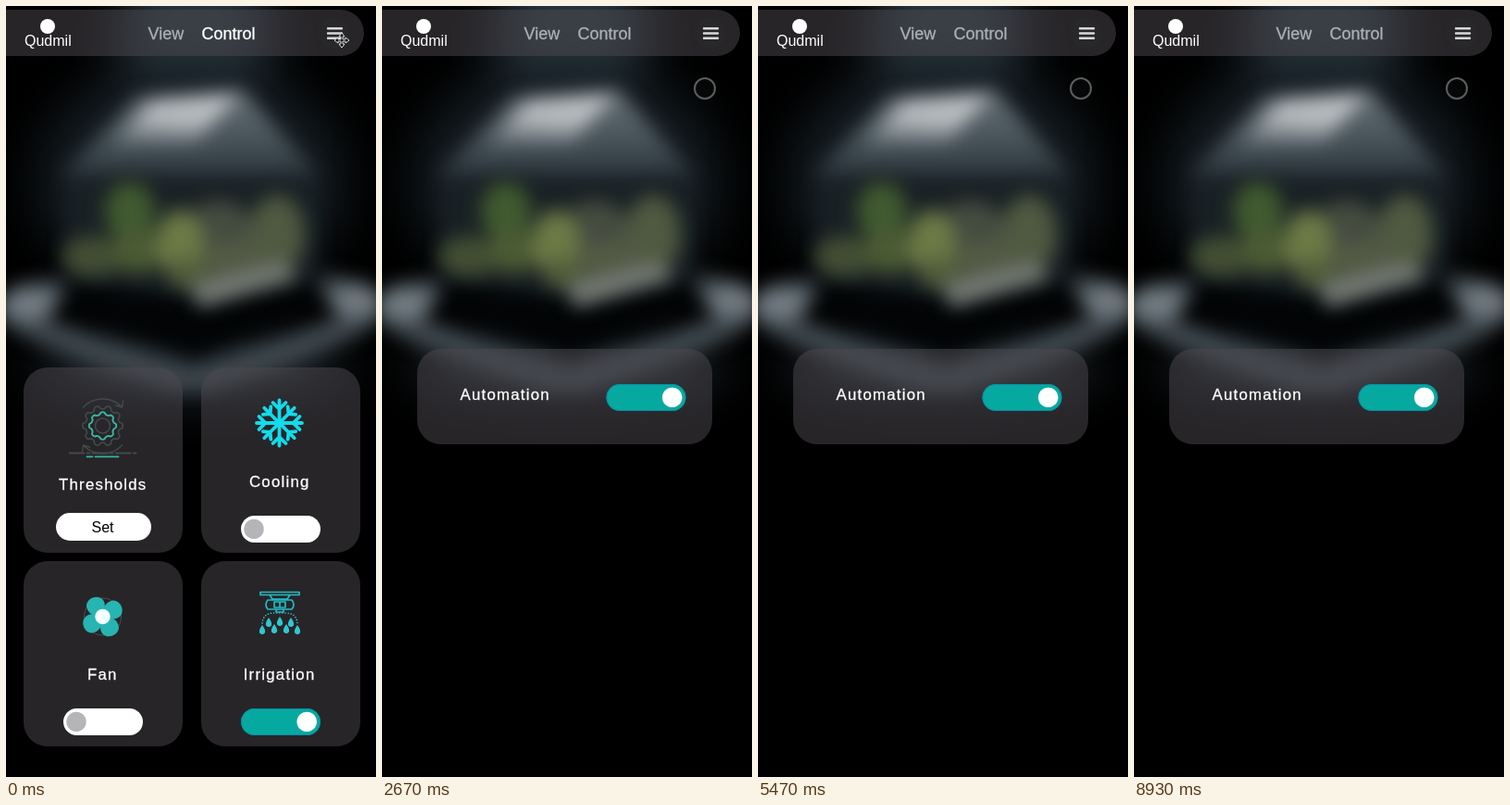
Recreate the animation shown at these times as an HTML page. Size 400 by 832 pixels, loop 9 s.

```html
<!DOCTYPE html>
<html lang="en">
<head>
<meta charset="utf-8">
<title>Greenhouse control</title>
<style>
  html, body { margin: 0; width: 100%; height: 100%; overflow: hidden; background: #000; }
  svg { position: absolute; inset: 0; width: 100%; height: 100%; display: block; }
  #scene { will-change: transform; }
  text { font-family: "Liberation Sans", Arial, sans-serif; fill: #fff; }
  .label { font-size: 16.8px; letter-spacing: 1.25px; stroke: #fff; stroke-width: .3px; }
  .nav { font-size: 18px; fill: #adb0b3; stroke: #adb0b3; stroke-width: .3px; }
  .nav.active { fill: #fff; stroke: #fff; }
  .glass { fill: rgba(78, 75, 81, .5); }
  .line { fill: none; stroke-linecap: round; stroke-linejoin: round; }
</style>
</head>
<body>
<svg id="scene" viewBox="0 0 400 832">
  <defs>
    <filter id="soft" filterUnits="userSpaceOnUse" x="-100" y="-100" width="600" height="700" color-interpolation-filters="sRGB"><feGaussianBlur stdDeviation="10"/></filter>
    <filter id="haze" filterUnits="userSpaceOnUse" x="-100" y="-100" width="600" height="700" color-interpolation-filters="sRGB"><feGaussianBlur stdDeviation="26"/></filter>
    <linearGradient id="roof" x2="0" y2="1">
      <stop offset="0" stop-color="#667077"/><stop offset=".55" stop-color="#4a555c"/><stop offset="1" stop-color="#2c363d"/>
    </linearGradient>
    <linearGradient id="shine" x1=".6" y1="0" x2=".4" y2="1">
      <stop offset="0" stop-color="#c3c7c9"/><stop offset=".5" stop-color="#b4b9bc"/><stop offset="1" stop-color="#59646b"/>
    </linearGradient>
  </defs>
  <g filter="url(#haze)">
    <ellipse cx="205" cy="25" rx="85" ry="75" fill="#27343c"/>
    <ellipse cx="200" cy="190" rx="165" ry="130" fill="#151d22"/>
    <ellipse cx="200" cy="388" rx="170" ry="32" fill="#232c32"/>
  </g>
  <g filter="url(#soft)">
    <path class="line" d="M52 308Q-6 314 6 332Q45 360 190 402" stroke="#3f494f" stroke-width="28"/>
    <path class="line" d="M350 304Q408 312 394 330Q355 360 212 402" stroke="#3f494f" stroke-width="28"/>
    <ellipse cx="26" cy="322" rx="28" ry="17" fill="#727c82"/>
    <ellipse cx="377" cy="319" rx="27" ry="17" fill="#707a80"/>
    <path d="M72 300L335 296L346 318L205 380L56 322Z" fill="#020405"/>
    <path d="M66 180H336V296L205 315L66 296Z" fill="#192125"/>
    <path d="M60 182L142 98L257 91L338 182Z" fill="url(#roof)"/>
    <path d="M112 152L158 102L254 94L206 146Z" fill="url(#shine)"/>
  </g>
  <g filter="url(#soft)">
    <ellipse cx="134" cy="222" rx="27" ry="32" fill="#415a30"/>
    <ellipse cx="95" cy="270" rx="34" ry="21" fill="#434f34"/>
    <ellipse cx="143" cy="264" rx="28" ry="24" fill="#4b5b34"/>
    <ellipse cx="230" cy="245" rx="38" ry="35" fill="#454c40"/>
    <ellipse cx="293" cy="246" rx="30" ry="42" fill="#4f5a41"/>
    <ellipse cx="255" cy="276" rx="46" ry="24" fill="#525944"/>
    <ellipse cx="188" cy="256" rx="26" ry="36" fill="#6c7a46"/>
    <ellipse cx="195" cy="288" rx="22" ry="16" fill="#525d3b"/>
    <path d="M200 300L300 276L316 294L208 326Z" fill="#757a75"/>
  </g>
</svg>

<svg viewBox="0 0 400 832">
  <path class="glass" d="M0 4H362A25 25 0 0 1 362 54H0Z"/>
  <circle cx="45" cy="22" r="8" fill="#fff"/>
  <text x="20" y="43" font-size="16">Qudmil</text>
  <text class="nav" x="153.5" y="35.5">View</text>
  <text class="nav" id="control" x="211.5" y="35.5">Control</text>
  <circle id="menu" cx="354.7" cy="29.5" r="16.5"/>
  <path id="bars" class="line" d="M348 24.2H363M348 29.5H363M348 34.8H363" stroke-width="2.4"/>
  <g id="controlPage"></g>
  <g id="settingsPage"></g>
  <g id="dropdown">
    <path d="M305 67H371V91A10 10 0 0 1 361 101H315A10 10 0 0 1 305 91Z" fill="#363c41"/>
    <text x="315" y="88" font-size="12">Settings</text>
  </g>
  <circle id="ring" r="11" fill="rgba(20,20,20,.2)" stroke-width="2"/>
  <path id="cursor" d="M0-8L3-4H1V-1H4V-3L8 0L4 3V1H1V4H3L0 8L-3 4H-1V1H-4V3L-8 0L-4-3V-1H-1V-4H-3Z" fill="#111" stroke="#ddd" stroke-width="1"/>
</svg>

<script>
const el = id => document.getElementById(id);
const LOOP = 9000, MENU_OPEN = 620, PAGE_SWITCH = 2250, TEAL = '#06a9a0';

const card = (x, y, w = 172, h = 200) =>
  `<rect class="glass" x="${x}" y="${y}" width="${w}" height="${h}" rx="26"/>`;
const label = (x, y, text) => `<text class="label" x="${x}" y="${y}">${text}</text>`;
const toggle = (x, y, on) =>
  `<rect x="${x}" y="${y}" width="86" height="29" rx="14.5" fill="${on ? TEAL : '#fff'}"/>` +
  (on ? `<rect x="${x + .5}" y="${y + .5}" width="85" height="28" rx="14" fill="none" stroke="#078fa8"/>` : '') +
  `<circle cx="${x + (on ? 71.2 : 14)}" cy="${y + 14.4}" r="10.7" fill="${on ? '#fff' : '#b5b4b8'}"/>`;
const line = (d, color, width, extra = '') =>
  `<path class="line" d="${d}" stroke="${color}" stroke-width="${width}" ${extra}/>`;
const group = (x, y, content) => `<g transform="translate(${x} ${y})">${content}</g>`;
const repeat = (count, make) => Array.from({ length: count }, (_, i) => make(i)).join('');

// Closed outline whose radius swells once per tooth
function gear(radius, depth, teeth) {
  const points = Array.from({ length: 120 }, (_, i) => {
    const a = i * Math.PI / 60;
    const r = radius + depth * Math.tanh(2 * Math.cos(teeth * a));
    return `${(r * Math.cos(a)).toFixed(1)} ${(r * Math.sin(a)).toFixed(1)}`;
  });
  return `M${points.join('L')}Z`;
}

function thresholdsIcon() {
  const grey = '#424a4d';
  return line(gear(20, 1.8, 10), grey, 1.6) +
    line(gear(13.5, 1.2, 8), '#3bb5a4', 1.9) +
    `<circle r="8" fill="none" stroke="${grey}" stroke-width="1.6"/>` +
    line('M-21-20A29 29 0 0 1 20-21M14-22L21-20L22-27M21 21A29 29 0 0 1-20 22M-14 23L-21 21L-22 28', grey, 1.4) +
    line('M-36 29.5H36', grey, 1.8, 'stroke-dasharray="16 3 3 3"') +
    line('M-17 33.3H-11M-8 33.3H17', '#35b6a4', 1.8);
}

function snowflake() {
  return repeat(8, i => `<g transform="rotate(${i * 45})">` +
    line(i % 2 ? 'M0 0V-23M-6-19L0-14L6-19' : 'M0 0V-24.5M-7-22L0-15L7-22', '#12dcec', 3.8) + '</g>');
}

function fan() {
  return '<circle r="20" fill="none" stroke="#4a5050"/>' +
    repeat(4, i => `<g transform="rotate(${i * 90 - 22})">` +
      '<path d="M0 0C-8-2-14-9-12-17C-9-25 4-25 7-17C9-11 4-5 0 0Z" fill="#27b4b2"/></g>') +
    '<circle r="8.2" fill="#f4ffff"/>';
}

function sprinkler() {
  const drops = [[-12, 8], [0, 7], [12, 8], [-6, 15], [7, 15], [-19, 16], [19, 16]];
  return line('M-21-23.5H21V-20.5H-21ZM-11-20.5L-8-16H8L11-20.5M-7-16H7M-13-15H13Q17-10 13-5H-13Q-17-10-13-15ZM-6-13H6V-7H-6ZM-4-5V-2H4V-5M0-13V-7', '#20bcc4', 1.7) +
    line('M-19 10Q-18-1-6-1H6Q18-1 19 10', '#28c3cb', 1.6, 'stroke-dasharray=".1 3"') +
    drops.map(([x, y]) =>
      `<path d="M${x} ${y - 4}C${x + 6} ${y + 4} ${x + 2} ${y + 6} ${x} ${y + 6}S${x - 6} ${y + 4} ${x} ${y - 4}Z" fill="#31c6d0"/>`).join('');
}

el('controlPage').innerHTML =
  card(19, 390) + card(211, 390) + card(19, 599) + card(211, 599) +
  group(104.5, 453, thresholdsIcon()) + group(295.5, 450, snowflake()) +
  group(104.5, 659, fan()) + group(296, 656, sprinkler()) +
  label(57, 522, 'Thresholds') + label(263, 519, 'Cooling') +
  label(88, 727, 'Fan') + label(256.7, 727, 'Irrigation') +
  '<rect x="54" y="547" width="103" height="30" rx="15" fill="#fff"/>' +
  '<text x="92.5" y="568" font-size="16" style="fill:#000">Set</text>' +
  toggle(254, 550, false) + toggle(62, 758, false) + toggle(254, 758, true);

el('settingsPage').innerHTML =
  card(38, 370, 319, 103) + label(84.5, 425, 'Automation') + toggle(242.5, 408, true);

const cursorPath = [[0, 363, 37], [70, 363, 37], [350, 380, 44]];
const ringPath = [[500, 356, 32], [700, 355, 32], [1000, 351, 65], [1500, 349, 89]];

// Eased position along [time, x, y] stops
function along(path, t) {
  const next = path.findIndex(stop => stop[0] > t);
  if (next === 0) return path[0].slice(1);
  if (next < 0) return path[path.length - 1].slice(1);
  const [t0, x0, y0] = path[next - 1], [t1, x1, y1] = path[next];
  const p = (t - t0) / (t1 - t0), e = p * p * (3 - 2 * p);
  return [x0 + (x1 - x0) * e, y0 + (y1 - y0) * e];
}
const show = (id, visible) => el(id).setAttribute('display', visible ? 'inline' : 'none');
const place = (id, path, t) => el(id).setAttribute('transform', `translate(${along(path, t)})`);

function draw(now) {
  const t = now % LOOP;
  const settings = t >= PAGE_SWITCH;
  const open = t >= MENU_OPEN && !settings;
  show('controlPage', !settings);
  show('settingsPage', settings);
  show('dropdown', open);
  show('cursor', t < 500);
  show('ring', t >= 500);
  place('cursor', cursorPath, t);
  place('ring', ringPath, t);
  el('ring').setAttribute('stroke', settings ? '#5b5e60' : '#77797b');
  el('control').classList.toggle('active', !settings);
  el('menu').setAttribute('fill', open ? TEAL : 'rgba(45,45,48,.35)');
  el('bars').setAttribute('stroke', open ? '#e8ffff' : '#d8d9da');
  requestAnimationFrame(() => draw(performance.now()));
}
draw(0);
</script>
</body>
</html>
```
